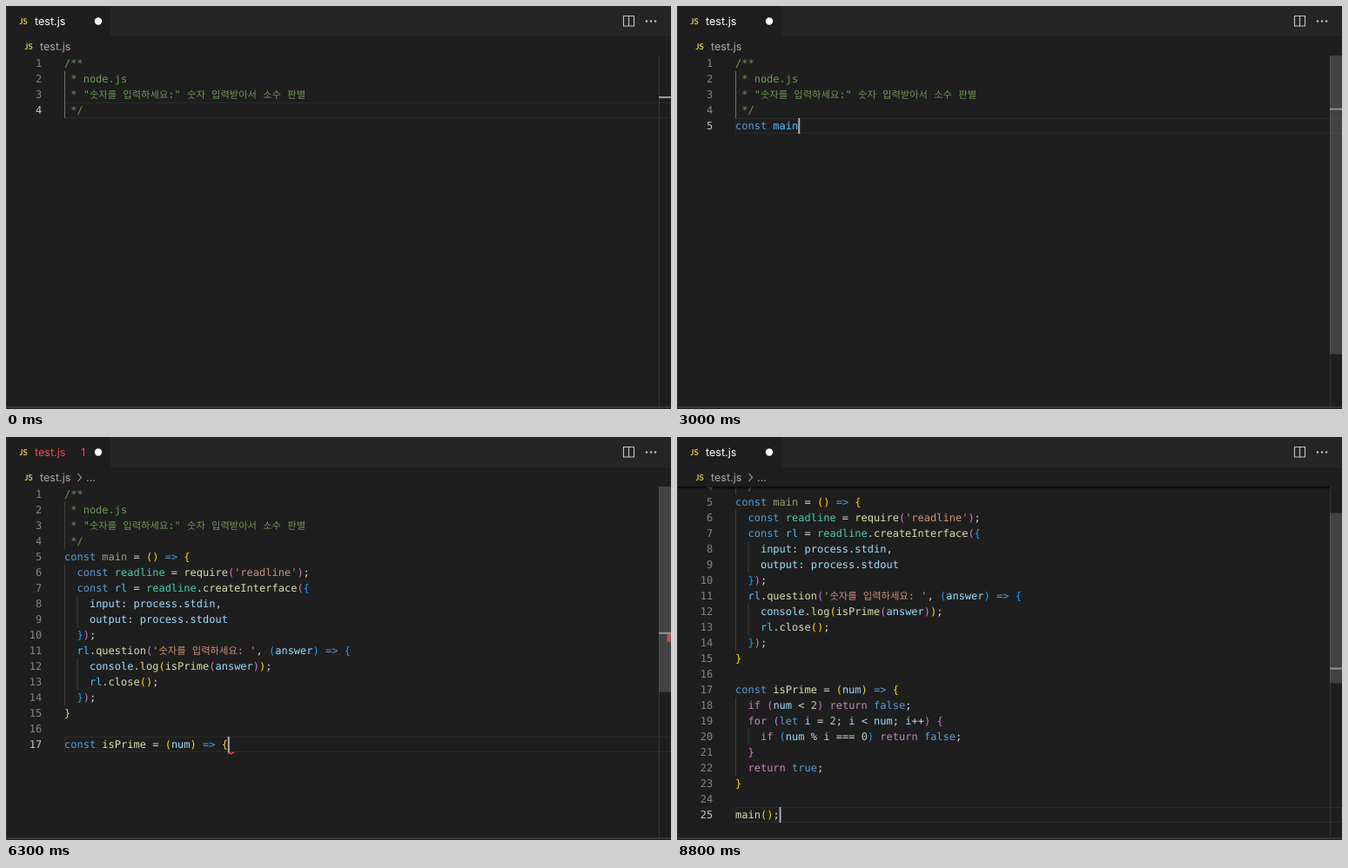
These frames come from a looping animation (764 by 464 pixels, 9200 ms). An HTML page:

```html
<!DOCTYPE html>
<html lang="ko">
<head>
<meta charset="utf-8">
<title>test.js</title>
<style>
  html, body { margin: 0; width: 100%; height: 100%; overflow: hidden; background: #1e1e1e; }
  svg { display: block; }
  text { white-space: pre; text-rendering: geometricPrecision; font: 12px 'DejaVu Sans Mono', monospace; }
  .ko { font: 11.3px 'Noto Sans CJK KR', 'Noto Sans CJK', sans-serif; }
  .ui { font: 12.6px Inter, sans-serif; }
  .js { font: 700 9.5px Lato, sans-serif; fill: #dcc94a; }
  .num { text-anchor: end; }
  .hit { font-weight: 700; fill: #2aaaff; }
  .line { fill: none; stroke-width: 1.1; stroke-linejoin: round; }
</style>
</head>
<body>
<svg id="stage" width="764" height="464" viewBox="0 0 764 464">
  <defs>
    <clipPath id="view"><rect y="57" width="764" height="404.5"/></clipPath>
    <linearGradient id="shade" x2="0" y2="1">
      <stop stop-color="#000" stop-opacity=".8"/><stop offset="1" stop-color="#000" stop-opacity="0"/>
    </linearGradient>
    <g id="cube" class="line"><path d="M0-6.3L5.6-3.2V3.2L0 6.3L-5.6 3.2V-3.2ZM-5.6-3.2L0 0L5.6-3.2M0 0V6.3"/></g>
    <g id="variable" class="line">
      <path d="M-4.5-4.5H-6.5V4.5H-4.5M4.5-4.5H6.5V4.5H4.5M-3.6-.6L1-3L3.6-1.6V.8L-1 3.2L-3.6 1.8ZM-3.6-.6L-1 .7L3.6-1.6M-1 .7V3.2"/>
    </g>
    <g id="keyword" class="line"><path d="M-6.5-5.5H-.5V-2.5H-6.5ZM1.5-4H6.5M-6.5 0H2M4 0H6.5M-6.5 3H-2M0 3H4M-6.5 6H6.5"/></g>
  </defs>
  <rect width="764" height="464" fill="#1e1e1e"/>
  <rect x="120" width="644" height="35" fill="#252526"/>
  <text class="js" x="15.5" y="20.8">JS</text>
  <text class="js" x="21.5" y="49.8">JS</text>
  <circle cx="106" cy="17.5" r="4.2" fill="#fff"/>
  <path class="line" stroke="#c5c5c5" d="M709.5 11.5H721.5V23H709.5ZM715.5 11.5V23"/>
  <g fill="#c5c5c5"><circle cx="736" cy="17.5" r="1.2"/><circle cx="741" cy="17.5" r="1.2"/><circle cx="746" cy="17.5" r="1.2"/></g>
  <text class="ui" x="39" y="50.6" fill="#a9a9a9">test.js</text>
  <g id="live"></g>
  <rect y="461.5" width="764" height="1.2" fill="#464646"/>
  <rect width="1" height="464" fill="#333"/>
</svg>
<script>
const LOOP = 9200, LEFT = 67, TOP = 57, ROW = 18, CHAR = 7.224, VIEW = 405;

const SOURCE = `/**
 * node.js
 * "숫자를 입력하세요:" 숫자 입력받아서 소수 판별
 */
const main = () => {
  const readline = require('readline');
  const rl = readline.createInterface({
    input: process.stdin,
    output: process.stdout
  });
  rl.question('숫자를 입력하세요: ', (answer) => {
    console.log(isPrime(answer));
    rl.close();
  });
}

const isPrime = (num) => {
  if (num < 2) return false;
  for (let i = 2; i < num; i++) {
    if (num % i === 0) return false;
  }
  return true;
}

main();`.split('\n');

const SUGGESTIONS = [
  ['cube', 'confirm'], ['variable', 'console'], ['keyword', 'const'], ['keyword', 'continue'],
  ['variable', 'Comment'], ['variable', 'CompositionEvent'], ['variable', 'ConstantSourceNode'],
  ['variable', 'ConvolverNode'], ['variable', 'CountQueuingStrategy'],
  ['variable', 'crossOriginIsolated'], ['cube', 'close'], ['variable', 'closed']
];

const END = 99;
// Each step lists only what changes; ghost is the last row of the inline suggestion.
const STEPS = [
  [0, { line: 4, col: END, ghost: 0, caret: 0, slider: 0, scroll: 0, err: 0, crumb: '', match: [], popup: 0, mainInk: '#4fc1ff' }],
  [700, { caret: 1, slider: .5 }],
  [800, { slider: 1 }],
  [1200, { caret: 0 }],
  [1500, { line: 5, col: 0, caret: 1 }],
  [2000, { caret: 0 }],
  ...Array.from({ length: 9 }, (_, i) => [2200 + i * 100, { col: i + 2, caret: 1, popup: i < 4 }]),
  [3200, { ghost: 5 }],
  [3300, { col: END, ghost: 0 }],
  [3600, { err: 5, mainInk: '#9d9d7b' }],
  [3700, { caret: 0 }],
  [3900, { ghost: 15 }],
  [4200, { caret: 1 }],
  [4300, { crumb: 'main' }],
  [4700, { caret: 0 }],
  [4800, { line: 15, ghost: 0, caret: 1, err: 15, match: [5, 15] }],
  [5000, { line: 16 }],
  [5100, { err: 0, match: [] }],
  [5300, { line: 17, col: 0 }],
  [5800, { ghost: 17 }],
  [5900, { col: END, ghost: 0 }],
  [6000, { crumb: '...' }],
  [6300, { err: 17 }],
  [6400, { caret: 0 }],
  [6500, { crumb: 'isPrime' }],
  [6900, { ghost: 23, caret: 1 }],
  [7100, { line: 23, ghost: 0, err: 23 }],
  [7200, { match: [17, 23] }],
  [7500, { err: 0, scroll: 27 }],
  [7600, { caret: 0 }],
  [8100, { line: 24, scroll: 45, caret: 1 }],
  [8200, { match: [] }],
  [8300, { line: 25, col: 0, scroll: 63 }],
  [8600, { ghost: 25 }],
  [8700, { col: END, ghost: 0 }],
  [8800, { crumb: '...' }]
];

let last = {};
const STATES = STEPS.map(([time, change]) => ({ time, state: last = { ...last, ...change } }));

const FUNCTIONS = /^(require|createInterface|question|log|isPrime|close|main)$/;
const RULES = [
  [/^'/, '#ce9178'], [/^(const|let|true|false|=>)$/, '#569cd6'], [/^(if|for|return)$/, '#c586c0'],
  [/^\d/, '#b5cea8'], [FUNCTIONS, '#dcdcaa'], [/^readline$/, '#4ec9b0'], [/^rl$/, '#4fc1ff'], [/^\w/, '#9cdcfe']
];
const BRACKETS = ['#ffd700', '#da70d6', '#179fff'];

const escape = s => s.replace(/&/g, '&amp;').replace(/</g, '&lt;');
const korean = s => escape(s).replace(/[가-힣]+/g, '<tspan class="ko">$&</tspan>');
const span = (s, fill) => `<tspan fill="${fill}">${korean(s)}</tspan>`;
const text = (x, y, body, fill, cls = '') => `<text x="${x}" y="${y}" fill="${fill}" class="${cls}">${body}</text>`;
const rect = (x, y, w, h, fill, extra = '') =>
  `<rect x="${x}" y="${y}" width="${w}" height="${h}" fill="${fill}" ${extra}/>`;
const icon = (name, x, y, ink) => `<use href="#${name}" x="${x}" y="${y}" stroke="${ink}"/>`;
const rowTop = n => TOP + (n - 1) * ROW;
const colX = c => LEFT + c * CHAR;

// Bracket depth carries over from line to line.
function highlighter(mainInk) {
  let depth = 0;
  return (code, n) => {
    if (n < 5) return span(code, '#6a9955');
    let previous = '';
    return (code.match(/'[^']*'|\w+|\s+|=>|[^\w\s]/g) || []).map(token => {
      let ink = (RULES.find(([rule]) => rule.test(token)) || [0, '#d4d4d4'])[1];
      if (/[({]/.test(token)) ink = BRACKETS[depth++ % 3];
      else if (/^[)}]$/.test(token)) ink = BRACKETS[--depth % 3];
      else if (token === 'main' && n === 5) ink = mainInk;
      else if (previous === 'const' && ink === '#9cdcfe') ink = '#4fc1ff';
      if (token.trim()) previous = token;
      return span(token, ink);
    }).join('');
  };
}

function drawCode(s) {
  const typed = SOURCE.slice(0, s.line);
  typed[s.line - 1] = typed[s.line - 1].slice(0, s.col);
  const indent = n => typed[n - 1] ? typed[n - 1].search(/\S|$/) : 0;
  const paint = highlighter(s.mainInk);

  let activeEnd = indent(s.line) ? s.line : s.line - 1, activeStart = activeEnd;
  while (indent(activeStart)) activeStart--;

  let out = rect(LEFT + .5, rowTop(s.line) + .5, 696, ROW - 1, 'none', 'stroke="#2b2b2b"');
  typed.forEach((code, i) => {
    const n = i + 1, y = rowTop(n);
    for (let level = 0; level * 2 < indent(n); level++) {
      const active = !level && n > activeStart && n <= activeEnd;
      out += rect(colX(level * 2), y, 1, ROW, active ? '#707070' : '#404040');
    }
    const tail = n === s.line && s.ghost ? span(SOURCE[i].slice(code.length), '#6b6b6b') : '';
    out += text(41.3, y + 13, n, n === s.line ? '#c6c6c6' : '#858585', 'num');
    out += text(LEFT, y + 13, paint(code, n) + tail, '#d4d4d4');
  });
  for (let n = s.line + 1; n <= s.ghost; n++)
    out += text(LEFT, rowTop(n) + 13, korean(SOURCE[n - 1]), '#6b6b6b');

  for (const n of s.match)
    out += rect(colX(SOURCE[n - 1].length - 1) + .5, rowTop(n) + .5, CHAR - .5, ROW - 1, 'rgba(0,100,0,.1)', 'stroke="#888"');
  if (s.err) {
    const x = colX(SOURCE[s.err - 1].length), y = rowTop(s.err) + ROW + 2;
    out += `<path class="line" stroke="#f14c4c" d="M${x} ${y}l2-2l2 2l2-2l1.2 1.2"/>`;
  }
  if (s.caret) out += rect(colX(typed[s.line - 1].length), rowTop(s.line), 2, ROW, '#aeafad');
  return `<g clip-path="url(#view)"><g transform="translate(0 ${-s.scroll})">${out}</g>` +
    (s.scroll ? rect(0, TOP, 750, 4, 'url(#shade)') : '') + '</g>';
}

function drawRuler(s) {
  const scale = VIEW / (VIEW + (Math.max(s.line, s.ghost) - 1) * ROW);
  const markY = n => TOP + (n - 1) * ROW * scale;
  let out = rect(750, TOP, 1, VIEW, '#353535');
  for (const n of s.match) out += rect(754.5, markY(n), 5, ROW * scale, '#a0a0a0');
  if (s.err) out += rect(759.5, markY(s.err), 4.5, ROW * scale, '#c9432f');
  out += rect(750, markY(s.line) - .5, 14, 2, '#a0a0a0');
  return out + rect(750, TOP + s.scroll * scale, 14, VIEW * scale, '#797979', `opacity="${.4 * s.slider}"`);
}

// Indices of the matched letters: adjacent first, then a capital, then any.
function matchLetters(word, query) {
  const hits = [], lower = word.toLowerCase();
  let from = 0;
  for (const letter of query) {
    let at = lower[from] === letter ? from : word.indexOf(letter.toUpperCase(), from);
    if (at < 0) at = lower.indexOf(letter, from);
    if (at < 0) return null;
    hits.push(at);
    from = at + 1;
  }
  return hits;
}

function drawPopup(s) {
  const query = SOURCE[4].slice(0, s.col), x = Math.round(colX(s.col)), y = rowTop(6);
  const rows = SUGGESTIONS.map(([kind, word]) => ({ kind, word, hits: matchLetters(word, query) })).filter(r => r.hits);
  let out = rect(x + .5, y + .5, 431, rows.length * ROW + 3, '#252526', 'stroke="#454545"');
  out += rect(x + 1, y + 1, 430, ROW, '#04395e');
  rows.forEach(({ kind, word, hits }, i) => {
    const mid = y + 10 + i * ROW;
    const ink = !i ? '#fff' : { cube: '#b180d7', variable: '#75beff', keyword: '#c5c5c5' }[kind];
    const body = [...word].map((c, k) => hits.includes(k) ? `<tspan class="hit">${c}</tspan>` : c).join('');
    out += icon(kind, x + 11, mid, ink) + text(x + 23, mid + 4, body, i ? '#d4d4d4' : '#fff');
  });
  if (rows.length > 11) out += rect(x + 422, y + 1, 9, 37, '#797979', 'opacity=".35"');
  return out;
}

function drawHeader(s) {
  let out = text(33, 22, 'test.js', s.err ? '#f14c4c' : '#fff', 'ui');
  if (s.err) out += text(86, 22, '1', '#f14c4c', 'ui');
  if (s.crumb) {
    const symbol = s.crumb !== '...';
    out += '<path class="line" stroke="#a9a9a9" d="M82.5 42L86.5 46.5L82.5 51"/>';
    if (symbol) out += icon('variable', 99.5, 46.5, '#75beff');
    out += text(symbol ? 111 : 92, 50.6, s.crumb, '#a9a9a9', 'ui');
  }
  return out;
}

const live = document.getElementById('live');
let shown = null;
function tick() {
  const now = performance.now() % LOOP;
  const { state } = STATES.findLast(step => step.time <= now);
  if (state !== shown) {
    shown = state;
    live.innerHTML = drawHeader(state) + drawCode(state) + drawRuler(state) + (state.popup ? drawPopup(state) : '');
  }
  requestAnimationFrame(tick);
}
tick();
</script>
</body>
</html>
```
